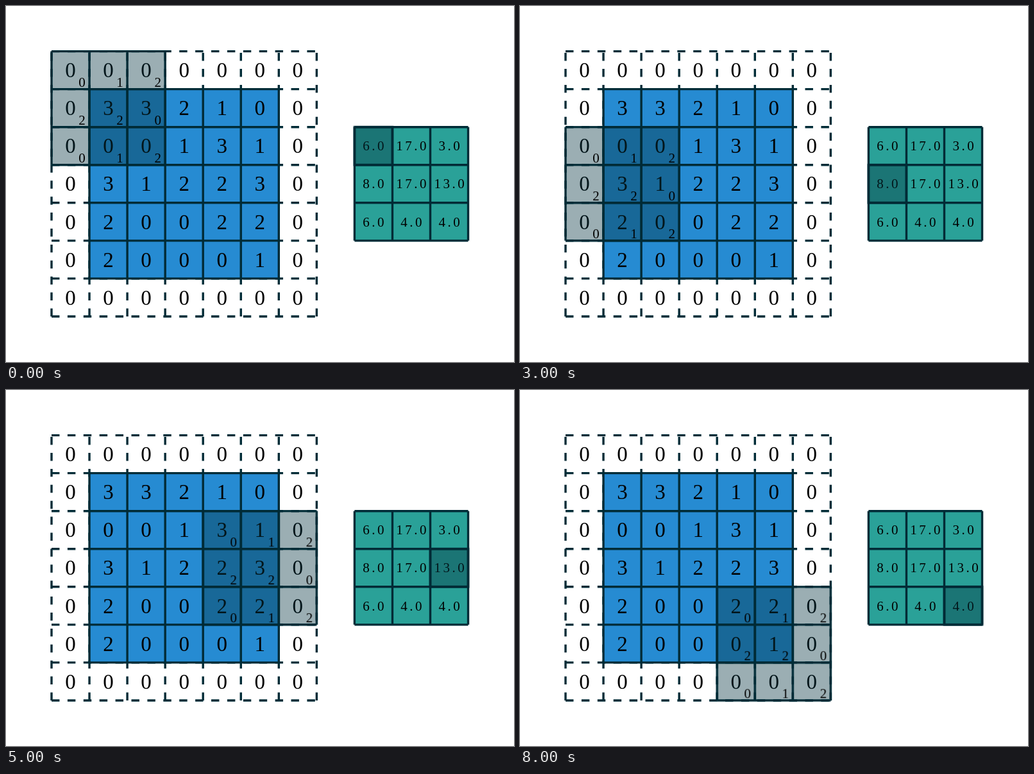
These frames come from a looping animation (792x555 px, 9 s). An HTML page:

```html
<!DOCTYPE html>
<html lang="en">
<head>
<meta charset="utf-8">
<title>Strided convolution</title>
<style>
  html, body { margin: 0; width: 100%; height: 100%; overflow: hidden; background: #fff; }
  svg { display: block; }
  text { font-family: "Liberation Serif", "Times New Roman", serif; text-anchor: middle; fill: #000; }
  .digit { font-size: 33px; }
  .small { font-size: 21px; }
  .result { letter-spacing: 3.5px; }
  .line { fill: none; stroke: #002b36; stroke-width: 3.4; }
  .dashed { stroke-dasharray: 12.45; }
  .shade { fill: #073642; fill-opacity: .4; }
</style>
</head>
<body>
<svg id="stage" width="792" height="555" viewBox="0 0 792 555"></svg>
<script>
const CELL = 59.05, LEFT = 71, TOP = 70.6;
const STEP_MS = 1000, STRIDE = 2, OUT = 3;
const input = ['33210', '00131', '31223', '20022', '20001'];
const kernel = ['012', '220', '012'];
const results = [['6.0', '17.0', '3.0'], ['8.0', '17.0', '13.0'], ['6.0', '4.0', '4.0']];
const stage = document.getElementById('stage');

function add(parent, tag, attrs, content = '') {
  const el = document.createElementNS('http://www.w3.org/2000/svg', tag);
  for (const key in attrs) el.setAttribute(key, attrs[key]);
  el.textContent = content;
  parent.append(el);
  return el;
}

const group = (col, row) =>
  add(stage, 'g', { transform: `translate(${LEFT + col * CELL} ${TOP + row * CELL})` });

const square = (parent, n, attrs) =>
  add(parent, 'rect', { width: n * CELL, height: n * CELL, ...attrs });

// Vertical lines run upwards so that the dashes start at the bottom.
function grid(parent, n, cls = 'line') {
  const size = n * CELL;
  let d = '';
  for (let i = 0; i <= n; i++) {
    const p = i * CELL;
    d += `M0 ${p}H${size}M${p} ${size}V0`;
  }
  add(parent, 'path', { d, class: cls });
}

function label(parent, col, row, content, cls, dx, dy) {
  add(parent, 'text', { x: (col + .5) * CELL + dx, y: (row + .5) * CELL + dy, class: cls }, content);
}

// Hard jumps over the output positions, row by row.
function jump(el, distance) {
  const count = OUT * OUT;
  const frames = Array.from({ length: count + 1 }, (_, i) => {
    const k = Math.min(i, count - 1);
    const x = (k % OUT) * distance, y = Math.floor(k / OUT) * distance;
    return { offset: i / count, transform: `translate(${x}px, ${y}px)`, easing: 'steps(1, end)' };
  });
  el.animate(frames, { duration: count * STEP_MS, iterations: Infinity });
}

const padded = group(0, 0);
grid(padded, 7, 'line dashed');

const image = group(1, 1);
square(image, 5, { fill: '#268bd2' });
grid(image, 5);

for (let r = 0; r < 7; r++)
  for (let c = 0; c < 7; c++)
    label(image, c - 1, r - 1, input[r - 1]?.[c - 1] ?? '0', 'digit', 0, 11.2);

const output = group(8, 2);
square(output, OUT, { fill: '#2aa198' });
grid(output, OUT);
results.forEach((row, r) => row.forEach((value, c) =>
  label(output, c, r, value, 'small result', 1.75, 7.2)));

const filter = add(group(0, 0), 'g', {});
square(filter, 3, { class: 'shade' });
grid(filter, 3);
kernel.forEach((row, r) => [...row].forEach((value, c) =>
  label(filter, c, r, value, 'small', 18, 25.8)));
jump(filter, STRIDE * CELL);

const marker = add(group(8, 2), 'g', {});
square(marker, 1, { class: 'shade' });
square(marker, 1, { class: 'line' });
jump(marker, CELL);
</script>
</body>
</html>
```
